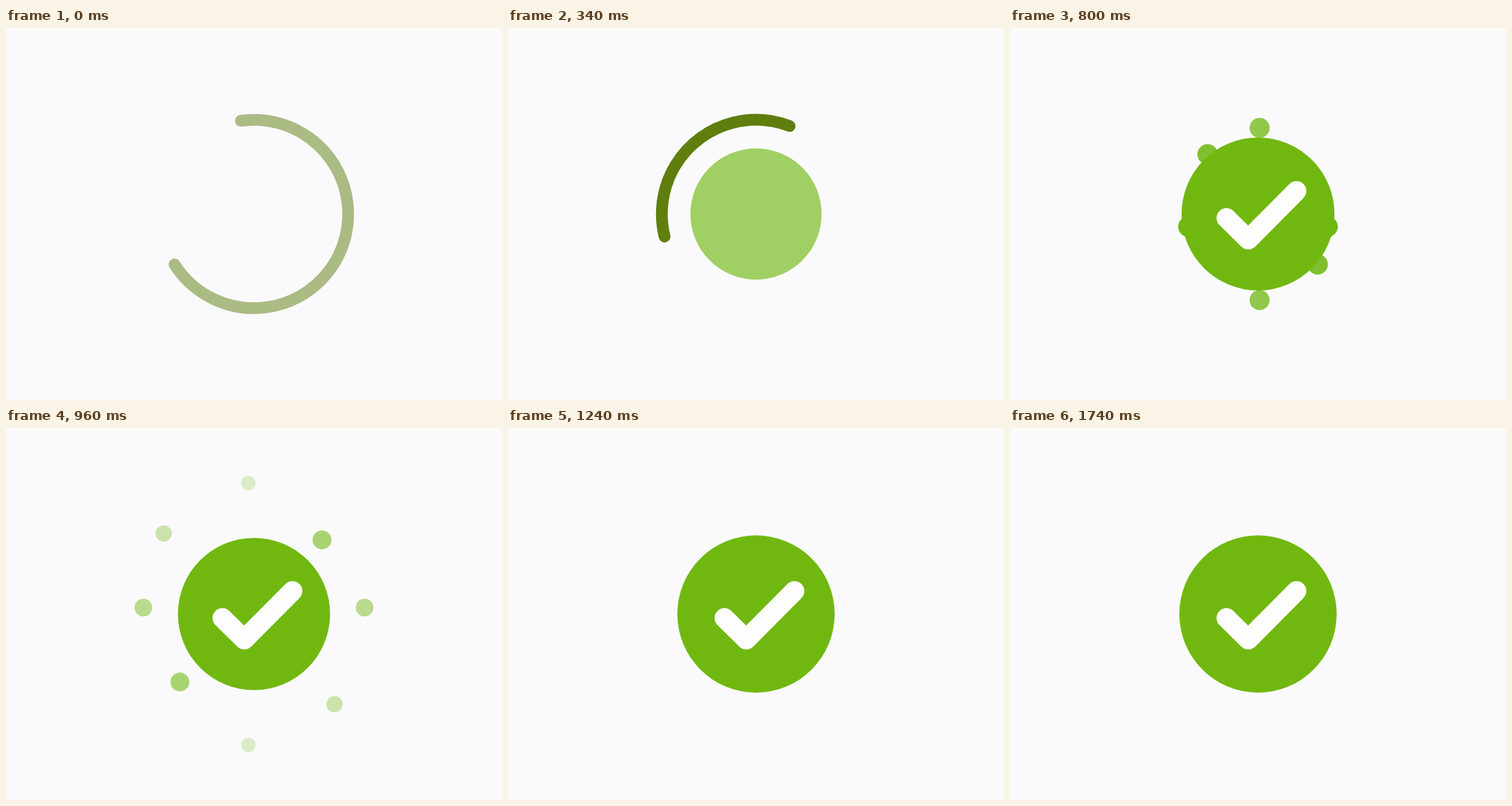
An HTML page for the animation above (1.76 s loop, 864x648 px).

```html
<!DOCTYPE html>
<html lang="en">
<head>
<meta charset="utf-8">
<title>Success check</title>
<style>
  html, body { margin: 0; width: 100%; height: 100%; overflow: hidden; background: #fafafc; }
  svg { display: block; width: 100vw; height: 100vh; }
</style>
</head>
<body>
<svg viewBox="0 0 864 648">
  <g transform="translate(432 324)">
    <circle id="arc" r="164" fill="none" stroke="#5f7e0e" stroke-width="20.5"
            stroke-linecap="round" pathLength="360"/>
    <g id="dots" fill="#70b810"></g>
    <circle id="disc" fill="#70b810"/>
    <path id="check" d="M-55 7L-17 44.5L67 -40" fill="none" stroke="#fefefe" stroke-width="34.5"
          stroke-linecap="round" stroke-linejoin="round" pathLength="1"/>
  </g>
</svg>
<script>
const LOOP = 1760, STEP = 20, STAGGER = 36;
const DISC_RADIUS = [[0, 0], [500, 150.7], [867, 131.5], [1200, 137]];
const DOT_DISTANCE = [[560, 60], [728, 121], [800, 150], [852, 175], [960, 228], [1027, 256]];
const PAIR_ANGLES = [0, -45, 90, 45];

const byId = id => document.getElementById(id);
const arc = byId('arc'), disc = byId('disc'), check = byId('check');

const clamp = x => Math.min(1, Math.max(0, x));
const progress = (t, from, to) => clamp((t - from) / (to - from));
const linear = p => p;
const smooth = p => p * p * (3 - 2 * p);

function track(t, keys, ease) {
  const next = keys.findIndex(key => key[0] > t);
  if (next < 0) return keys[keys.length - 1][1];
  if (next === 0) return keys[0][1];
  const [t0, v0] = keys[next - 1], [t1, v1] = keys[next];
  return v0 + (v1 - v0) * ease(progress(t, t0, t1));
}

function set(node, attributes) {
  for (const name in attributes) node.setAttribute(name, attributes[name]);
}

const dots = PAIR_ANGLES.flatMap((angle, order) => [-1, 1].map(side => {
  const node = document.createElementNS('http://www.w3.org/2000/svg', 'circle');
  node.setAttribute('transform', `rotate(${angle})`);
  byId('dots').append(node);
  return { node, side, delay: order * STAGGER };
}));

function drawArc(t) {
  const tail = 360 * smooth(progress(t, 20, 550));
  const head = 360 * smooth(progress(t, -312, 188));
  const length = head - tail;
  set(arc, {
    transform: `rotate(${tail - 98 + t * 0.085})`,
    'stroke-dasharray': `${Math.max(0, length)} 720`,
    opacity: length > 0.5 ? 0.5 + 0.5 * progress(t, 0, 200) : 0
  });
}

function drawDot({ node, side, delay }, t) {
  const local = t - delay;
  const distance = track(local, DOT_DISTANCE, linear);
  const fade = progress(local, 727, 1027);
  // Both dots of a pair drift sideways together while they fly apart.
  const drift = Math.min(40, 0.0047 * (distance - 155.5) * (distance - 257));
  set(node, {
    cx: drift,
    cy: side * distance,
    r: 18 - 9 * fade * fade,
    opacity: local < 560 ? 0 : 1 - fade
  });
}

function render(t) {
  drawArc(t);
  set(disc, { r: track(t, DISC_RADIUS, smooth), opacity: progress(t, 0, 525) });
  dots.forEach(dot => drawDot(dot, t));
  const drawn = smooth(progress(t, 560, 780));
  set(check, { 'stroke-dasharray': `${drawn} 2`, opacity: drawn > 0 ? 1 : 0 });
}

const start = performance.now();
function tick() {
  const t = (performance.now() - start) % LOOP;
  render(Math.floor(t / STEP) * STEP);
  requestAnimationFrame(tick);
}
tick();
</script>
</body>
</html>
```
